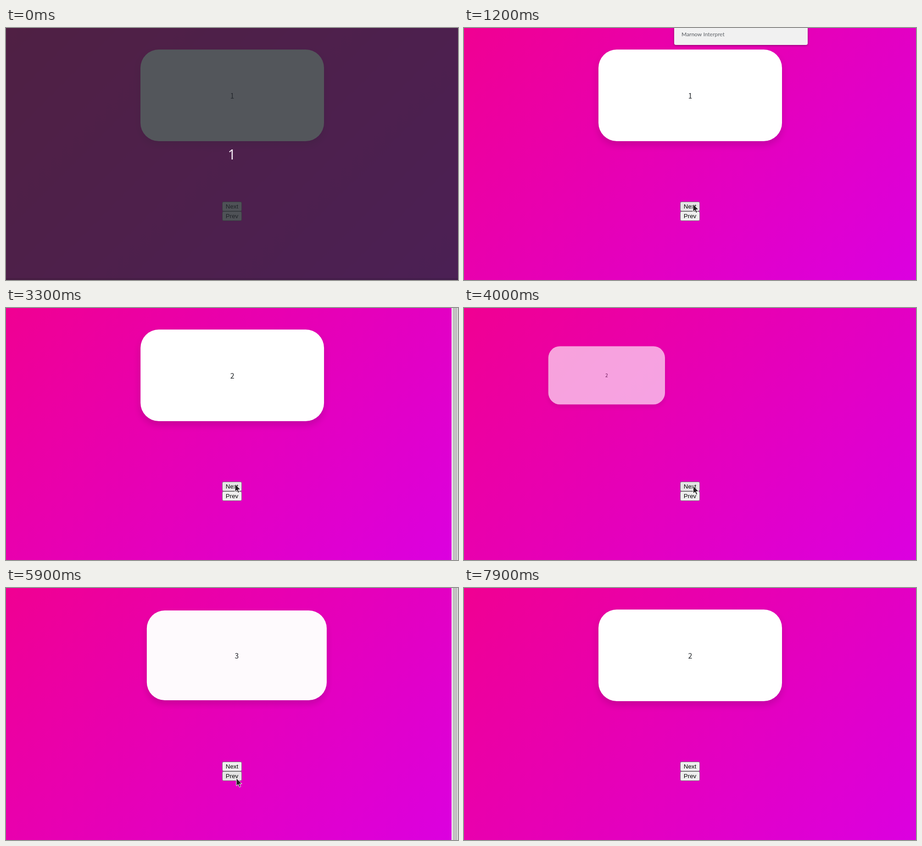
Recreate the animation shown at these times as an HTML page. Size 985x550 px, loop 8.3 s.

```html
<!DOCTYPE html>
<html lang="en">
<head>
<meta charset="utf-8">
<title>Card carousel</title>
<style>
html, body { margin: 0; width: 100%; height: 100%; overflow: hidden; }
body { position: relative; background: linear-gradient(135deg, #f00092, #db00e0); }
body > * { position: absolute; box-sizing: border-box; }
#card {
  left: 293px; top: 47px; width: 400px; height: 200px; border-radius: 40px;
  background: #fff; box-shadow: 0 8px 16px rgba(0, 0, 0, .15);
  display: flex; align-items: center; justify-content: center;
  font: 16px/24px "Noto Sans CJK JP", "Noto Sans CJK SC", sans-serif; color: #212529;
}
.button {
  left: 471px; width: 43px; height: 21px; border: 1px solid #767676; border-radius: 3px;
  background: #efefef; color: #000; text-align: center;
  font: 13.333px/19px "Liberation Sans", Arial, sans-serif;
}
.button.hover { background: #e5e5e5; }
#next { top: 379px; }
#prev { top: 400px; }
#bubble {
  left: 458px; top: -20px; width: 291px; height: 57px; border-radius: 4px;
  padding: 25px 0 0 16px; background: #f1f1f1; color: #5f6368;
  box-shadow: 0 1px 4px rgba(0, 0, 0, .45);
  font: 12px/18px Lato, sans-serif; white-space: nowrap;
}
#bubble b { font-weight: 500; }
#bar { right: 0; top: 0; width: 14px; height: 100%; background: #c1c1c1; border: solid #fafafa; border-width: 0 1px 0 2px; }
#cursor { left: -2px; top: -2px; }
#shade { inset: 0; background: rgba(37, 41, 47, .79); border-bottom: 4px solid rgba(0, 0, 0, .1); }
#count {
  position: absolute; left: 0; width: 984px; top: 255px; text-align: center;
  font: 30px/41px "Noto Sans", sans-serif; color: #f3e8f3;
}
</style>
</head>
<body>
<div id="card"></div>
<div class="button" id="next">Next</div>
<div class="button" id="prev">Prev</div>
<div id="bar"></div>
<div id="bubble"><b>Marnow</b> Interpret</div>
<svg id="cursor" width="18" height="26" viewBox="-2 -2 18 26">
  <path d="M0 0V17L4 13.5L6.7 19.6L9.4 18.4L6.8 12.5H12Z" fill="#222" stroke="#fff"/>
</svg>
<div id="shade"><div id="count">1</div></div>
<script>
const LOOP = 8300, STEP = 100, SLIDE = 1000, FAR = 500;
const $ = id => document.getElementById(id);

// start, side (1 right, -1 left), entering, digit
const slides = [
  [100, 1, true, 1], [1290, -1, false, 1],
  [2310, 1, true, 2], [3580, -1, false, 2],
  [4570, 1, true, 3], [5800, 1, false, 3],
  [6900, -1, true, 2]
];
const barTimes = [[100, 1200], [2400, 3500], [4600, 5400], [5900, 6800]];
// time, x, y of the pointer tip
const path = [
  [600, 201, -25], [1200, 499, 384], [3900, 499, 384], [4300, 502, 415],
  [6000, 502, 415], [6700, 201, 29], [6900, 201, 29], [7200, 190, -30]
];

// cubic-bezier(.42, 0, .58, 1)
function ease(x) {
  if (x >= 1) return 1;
  let lo = 0, hi = 1, u = .5;
  for (let i = 0; i < 24; i++) {
    u = (lo + hi) / 2;
    const v = 1 - u;
    if (1.26 * u * v * v + 1.74 * u * u * v + u * u * u < x) lo = u; else hi = u;
  }
  return u * u * (3 - 2 * u);
}

function pointer(t) {
  const i = path.findIndex(p => p[0] > t);
  if (i < 1) return [-50, -50];
  const [t0, x0, y0] = path[i - 1], [t1, x1, y1] = path[i];
  const k = ease((t - t0) / (t1 - t0));
  return [x0 + (x1 - x0) * k, y0 + (y1 - y0) * k];
}

const show = (id, on) => { $(id).style.display = on ? "" : "none"; };

function drawCard(t) {
  const [start, side, entering, digit] = slides.findLast(s => s[0] <= t) || [-SLIDE, 1, true, 1];
  const k = ease((t - start) / SLIDE);
  const size = entering ? k : 1 - k;
  const style = $("card").style;
  $("card").textContent = digit;
  style.opacity = size;
  style.transform = `translateX(${side * FAR * (1 - size)}px) scale(${size})`;
}

function draw(t) {
  drawCard(t);
  const [x, y] = pointer(t);
  $("cursor").style.transform = `translate(${x}px, ${y}px)`;
  for (const [id, top] of [["next", 379], ["prev", 400]]) {
    $(id).classList.toggle("hover", x >= 471 && x < 514 && y >= top && y < top + 21);
  }
  show("bar", barTimes.some(([from, to]) => t >= from && t < to));
  show("bubble", t >= 200 && t < 1300);
  show("shade", t < 100);
}

function frame() {
  const t = performance.now() % LOOP;
  draw(Math.floor(t / STEP) * STEP);
  requestAnimationFrame(frame);
}
frame();
</script>
</body>
</html>
```
